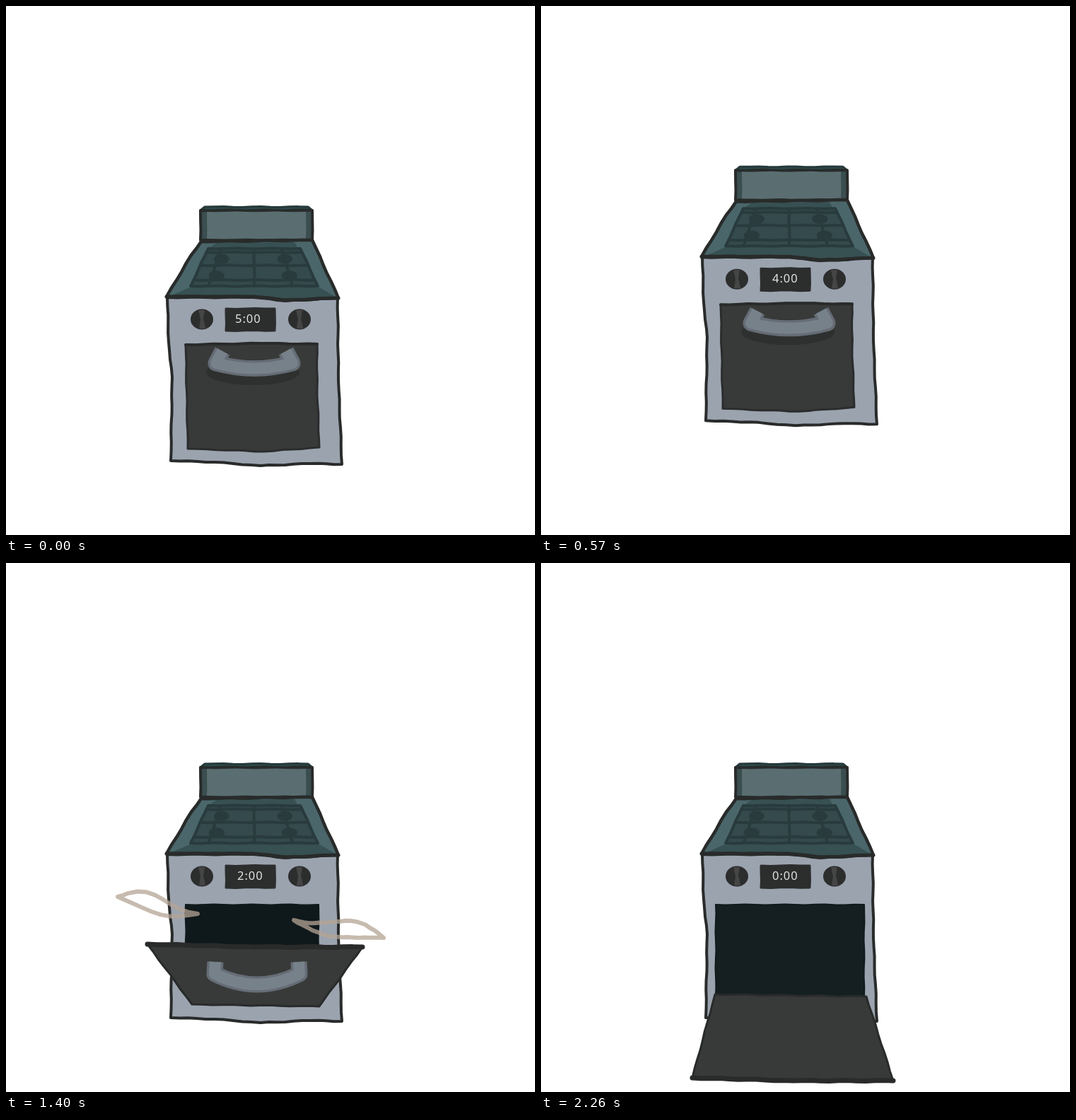
Write an HTML page with a canvas that moves like this. It is 748 px wide and 748 px high and loops after 2.29 s.

```html
<!DOCTYPE html>
<html>
<head>
<meta charset="utf-8">
<style>
html, body { margin: 0; width: 100%; height: 100%; overflow: hidden; background: #fff; }
canvas { display: block; width: 100vmin; height: 100vmin; }
</style>
</head>
<body>
<canvas id="stage" width="748" height="748"></canvas>
<script>
const ctx = document.getElementById('stage').getContext('2d');
const LOOP = 2290, DOOR_OPENS = 1270;
const INK = '#282b2a', METAL = '#383a39', GRATE = '#293b3d';

const clamp = v => Math.max(0, Math.min(1, v));
const ramp = (t, from, to) => clamp((t - from) / (to - from));
const lerp = (a, b, u) => a + (b - a) * u;
const mix = (a, b, u) => a.map((v, i) => lerp(v, b[i], u));

// Path through [x, y] points, slightly uneven like a hand-drawn line.
function draw(points, { fill, stroke, width = 4, open = false, wobble = 0.5 }) {
  ctx.beginPath();
  ctx.moveTo(...points[0]);
  const ends = open ? points.slice(1) : [...points.slice(1), points[0]];
  ends.forEach((end, i) => {
    const start = points[i];
    const dx = end[0] - start[0], dy = end[1] - start[1], len = Math.hypot(dx, dy) || 1;
    const steps = Math.ceil(len / 14);
    for (let s = 1; s <= steps; s++) {
      const off = s < steps ? wobble * Math.sin(s * 1.6 + i * 2) / len : 0;
      const [x, y] = mix(start, end, s / steps);
      ctx.lineTo(x - dy * off, y + dx * off);
    }
  });
  if (!open) ctx.closePath();
  if (fill) { ctx.fillStyle = fill; ctx.fill(); }
  if (stroke) { ctx.strokeStyle = stroke; ctx.lineWidth = width; ctx.stroke(); }
}
const line = (points, stroke, width) => draw(points, { stroke, width, open: true });
const box = (x1, y1, x2, y2) => [[x1, y1], [x2, y1], [x2, y2], [x1, y2]];

function ellipse(x, y, rx, ry, color) {
  ctx.fillStyle = color;
  ctx.beginPath();
  ctx.ellipse(x, y, rx, ry, 0, 0, 7);
  ctx.fill();
}

// Hob coordinates in perspective: u from -1 to 1 across, v from 0 to 1 to the front.
const hob = (u, v) => [351 + u * lerp(65, 90, v), lerp(343, 396, v)];

function drawHob() {
  draw([[275, 289], [281, 284], [427, 284], [433, 289]], { fill: '#2e4b4c', stroke: '#263a3b', width: 3 });
  draw(box(275, 289, 433, 331), { fill: '#3a4e50', stroke: INK });
  draw(box(284, 291, 424, 329), { fill: '#5a6e71' });

  const top = [[276, 333], [433, 331], [470, 413], [395, 416], [350, 411], [227, 411], [262, 352]];
  draw(top, { fill: '#4a666a' });
  draw([[300, 334], [408, 334], [441, 397], [468, 412], [395, 415], [350, 410], [231, 410], [262, 397], [287, 343]],
    { fill: '#375052' });
  draw([hob(-1, 0), hob(1, 0), hob(1, 1), hob(-1, 1)], { fill: '#344a4c', stroke: GRATE });
  for (const v of [0.28, 0.72])
    for (const u of [-0.64, 0.6]) ellipse(...hob(u, v), 11, 7, GRATE);
  for (const v of [0.1, 0.45, 0.84]) line([hob(-1, v), hob(1, v)], GRATE, 4);
  for (const u of [-0.72, 0, 0.6]) line([hob(u, 0), hob(u, 1)], GRATE, 4);
  draw(top, { stroke: INK, width: 4.5 });
}

function drawFront(t) {
  draw([[228, 412], [350, 412], [395, 417], [469, 413], [470, 530], [475, 648], [430, 647],
    [360, 650], [295, 645], [233, 643], [235, 525], [230, 475]], { fill: '#9ba3af', stroke: INK });
  line([[227, 411], [350, 411], [395, 416], [470, 413]], INK, 5);
  for (const x of [277, 415]) {
    ellipse(x, 443, 16, 14.5, '#2c2d2d');
    draw([[x - 5, 430], [x + 4, 430], [x + 2, 442], [x + 5, 456], [x - 4, 456], [x - 2, 443]], { fill: '#454545' });
  }
  draw(box(311, 428, 380, 459), { fill: '#2c2e2e', stroke: '#2c2e2e', width: 3 });
  const left = Math.max(0, 5 - Math.floor((t + 36) / 382));
  ctx.fillStyle = '#e2e2e2';
  ctx.font = '500 16.5px "Noto Sans", "Open Sans", sans-serif';
  ctx.letterSpacing = '1px';
  ctx.fillText(left + ':00', left === 5 ? 324 : 327, 448);
}

// open: 0 on the shut door, 1 on the tilted one.
function drawHandle(open) {
  const x = lerp(351, 355, open), y = lerp(505, 581, open);
  const half = lerp(54, 60, open), sag = lerp(15, 30, open), prong = half - lerp(9, 1, open);
  ctx.beginPath();
  ctx.moveTo(x - prong, y - 17);
  ctx.lineTo(x - half, y);
  ctx.quadraticCurveTo(x, y + sag, x + half, y);
  ctx.lineTo(x + prong, y - 17);
  ctx.lineCap = 'butt';
  for (const [color, width] of [['#656c75', 23], ['#77818a', 16]]) {
    ctx.strokeStyle = color;
    ctx.lineWidth = width;
    ctx.stroke();
  }
  ctx.lineCap = 'round';
}

function drawShutDoor() {
  draw([[254, 479], [360, 477], [440, 478], [440, 540], [443, 624], [365, 630], [257, 626]],
    { fill: METAL, stroke: '#2a2d2c', width: 3 });
  line([[254, 479], [360, 477], [440, 478]], INK, 4);
  ellipse(349, 518, 66, 18, '#2d302e');
  drawHandle(0);
}

// Front edge of the falling door: time, height, half width.
const DOOR_POSES = [[1270, 495, 108], [1400, 541, 152], [1470, 541, 152], [1740, 659, 118], [1800, 730, 142]];

function doorEdge(t) {
  const next = DOOR_POSES.findIndex(pose => t < pose[0]);
  if (next < 0) return DOOR_POSES.at(-1).slice(1);
  const a = DOOR_POSES[next - 1], b = DOOR_POSES[next];
  return mix(a, b, ramp(t, a[0], b[0])).slice(1);
}

function drawOpenDoor(t) {
  const fall = ramp(t, 1470, 1740);
  const middle = lerp(348, 352, fall), inside = lerp(94, 105, fall);
  const shade = mix([15, 24, 27], [21, 31, 33], ramp(t, 1740, 2260));
  draw(box(middle - inside, 483, middle + inside, lerp(585, 612, fall)),
    { fill: `rgb(${shade.map(Math.round)})`, stroke: '#10191b', width: 2 });

  const [y, half] = doorEdge(t);
  const x = lerp(352, 356, fall), hingeY = lerp(625, 611, fall), hinge = lerp(90, 107, fall);
  const front = [[x - half, y - 2], [x, y + 2], [x + half, y + 2]];
  draw([...front, [353 + hinge, hingeY + 2], [353 - hinge, hingeY - 1]], { fill: METAL, stroke: INK, width: 3 });
  line(front, '#292b2a', 7);
  if (t < 1560) drawHandle(ramp(t, 1270, 1400));
}

// Each wisp runs from tail to tip, first out of the oven, then down by the floor.
const WISPS = [
  { side: -1, near: [[271, 496], [158, 472]], far: [[149, 607], [118, 643]] },
  { side: 1, near: [[407, 505], [534, 530]], far: [[508, 617], [517, 671]] }
];

// Closed ribbon around a line that bends like an S.
function ribbon(tail, tip, half, bend) {
  const dx = tip[0] - tail[0], dy = tip[1] - tail[1], len = Math.hypot(dx, dy) || 1;
  return Array.from({ length: 20 }, (_, i) => {
    const side = i < 10 ? 1 : -1;
    const u = (i < 10 ? i : 19 - i) / 9;
    const off = (side * half * Math.sin(Math.PI * u ** 1.3) + bend * Math.sin(2 * Math.PI * u)) / len;
    return [tail[0] + dx * u - dy * off, tail[1] + dy * u + dx * off];
  });
}

function drawWisps(t) {
  if (t < 1320) return;
  const grow = ramp(t, 1320, 1400), drift = ramp(t, 1470, 1740);
  const sink = 45 * ramp(t, 1740, 2120);
  ctx.globalAlpha = lerp(0.75, 0.42, drift) * grow * (1 - ramp(t, 1740, 2120));
  for (const { side, near, far } of WISPS) {
    const shift = side * 20 * Math.sin(Math.PI * drift);
    const place = i => {
      const [x, y] = mix(near[i], far[i], drift);
      return [x + shift, y + sink];
    };
    const tail = place(0), tip = mix(tail, place(1), grow);
    draw(ribbon(tail, tip, lerp(12, 7, drift), side * 4), { stroke: '#b5a594', width: 6 });
  }
  ctx.globalAlpha = 1;
}

// Damped sway in degrees.
const tilt = t => 22 * Math.sin(2 * Math.PI * t / 400) * (1 - clamp(t / 540)) ** 1.3;

function lift(t) {
  if (t < 540) return -44 * (1 - Math.exp(-t / 60));
  if (t < 1020) return -44 - 89 * (1 - (1 - ramp(t, 540, 810)) ** 1.3);
  return -88 * (1 - ramp(t, 1020, 1080));
}

function render(t) {
  ctx.fillStyle = '#fff';
  ctx.fillRect(0, 0, 748, 748);
  ctx.lineJoin = ctx.lineCap = 'round';
  const step = Math.floor(t / 30) * 30, angle = tilt(step);
  ctx.save();
  ctx.translate(354 + angle * 0.8, 648 + lift(step));
  ctx.rotate(angle * Math.PI / 180);
  ctx.translate(-354, -648);
  drawHob();
  drawFront(t);
  if (t < DOOR_OPENS) drawShutDoor();
  else drawOpenDoor(t);
  drawWisps(t);
  ctx.restore();
}

const begin = performance.now();
function tick() {
  render((performance.now() - begin) % LOOP);
  requestAnimationFrame(tick);
}
tick();
</script>
</body>
</html>
```
